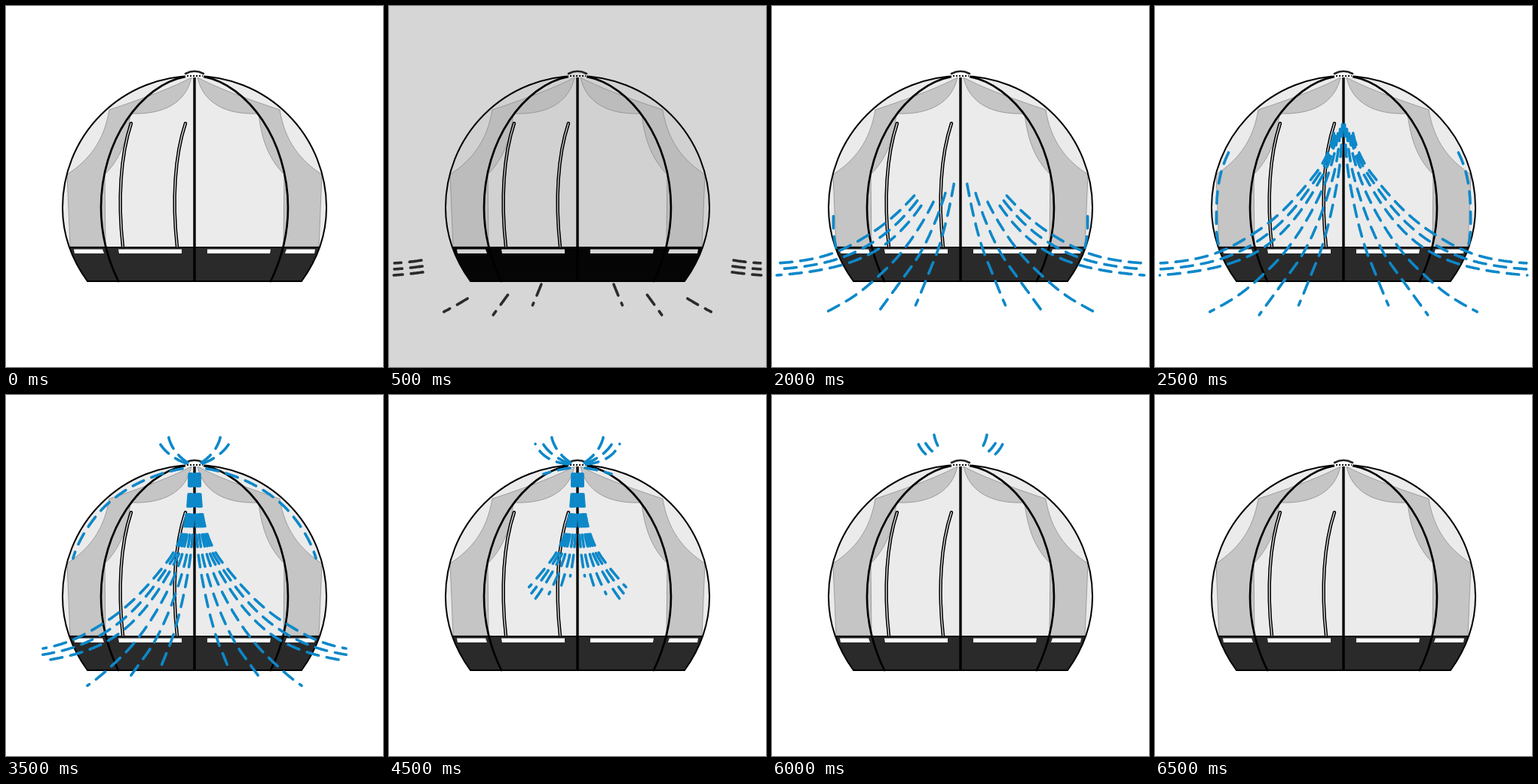
Recreate the animation shown at these times as an HTML page. Size 500 px wide and 480 px high, loop 7000 ms.

```html
<!DOCTYPE html>
<html lang="en">
<head>
<meta charset="utf-8">
<title>Tent airflow</title>
<style>
  html, body { margin: 0; width: 100%; height: 100%; overflow: hidden; }
  svg {
    display: block; width: 100%; height: 100%; fill: none; stroke-linecap: round;
    --paper: #fff; --net: #ebebeb; --cloth: #c5c5c5; --base: #2a2a2a; --air: #0d88c9;
    background: var(--paper);
  }
  svg.dim { --paper: #d6d6d6; --net: #d1d1d1; --cloth: #bcbcbc; --base: #050505; --air: #2b2b2b; }
  .line { stroke: #000; }
  .cloth { fill: var(--cloth); stroke: #858585; stroke-width: .7; }
  .paper { fill: var(--paper); }
  .air { stroke: var(--air); stroke-width: 3.6; stroke-dasharray: 16 11; }
</style>
</head>
<body>
<svg id="stage" viewBox="0 0 500 480">
  <defs>
    <path id="dome" d="M108 366C87 337 75 303 75 268A175 175 0 0 1 425 268C425 303 413 337 392 366Z"/>
  </defs>
  <use href="#dome" fill="var(--net)"/>
  <path id="curtain" class="cloth" d="M246 95Q215 112 137 138C130 180 110 205 81 224L85 320H132L131 224C150 205 161 180 165 143C210 145 239 128 246 95Z"/>
  <use href="#curtain" transform="matrix(-1 0 0 1 500 0)"/>
  <path fill="var(--base)" d="M83 320Q92 345 108 366H392Q408 345 417 320Z"/>
  <path class="line" stroke-width="2" d="M84 321H416"/>
  <g id="half">
    <path class="paper" d="M90 323.500H128L130 329H91ZM149 323.500H233V329H150Z"/>
    <path class="line" stroke-width="2.7" d="M238 94C179 105 126 179 126 268C126 300 134 335 149 366"/>
  </g>
  <use href="#half" transform="matrix(-1 0 0 1 500 0)"/>
  <g id="poles"></g>
  <use href="#dome" class="line" stroke-width="2"/>
  <path class="line" stroke-width="3.4" stroke-linecap="butt" d="M250 95V366"/>
  <path class="paper" d="M238 91Q250 86 262 91V95H238Z"/>
  <path class="line" stroke-width="2" stroke-linecap="butt" stroke-dasharray="2 2" d="M240 93H261"/>
  <path stroke="#222" stroke-width="2.6" d="M238 90Q250 83.500 262 90"/>
  <g id="air"></g>
  <use href="#air" transform="matrix(-1 0 0 1 500 0)"/>
</svg>
<script>
const LOOP = 7000, STEP = 500;
const stage = document.getElementById('stage');
const air = document.getElementById('air');
const clamp = value => Math.max(0, Math.min(1, value));

function addPath(parent, attributes) {
  const path = document.createElementNS('http://www.w3.org/2000/svg', 'path');
  for (const key in attributes) path.setAttribute(key, attributes[key]);
  return parent.appendChild(path);
}

const poles = document.getElementById('poles');
for (const x of [166, 238]) {
  const d = `M${x} 156c-14 42 -18 102 -11 164`;
  addPath(poles, { d, stroke: '#000', 'stroke-width': 4.4 });
  addPath(poles, { d, stroke: 'var(--net)', 'stroke-width': 1.3 });
}

const sideCurve = i =>
  `M${243 + i} 105C${243 + i} 160 ${235 + 2 * i} 195 ${212 + 5.5 * i} 224` +
  `S${165 + 10 * i} ${281 + 5 * i} ${130 + 10 * i} ${303 + 7 * i}` +
  `S70 ${338 + 7.5 * i} 6 ${342 + 8 * i}`;

// Curves start at the vent. head and tail give the travelled share of the way at each step.
const streams = [
  { // air drawn in from the sides and the ground, rising to the vent
    curves: [
      ...[0, 1, 2].map(sideCurve),
      'M246 105C246 165 240 195 229 226S190 312 154 347S106 389 72 407',
      'M247 105C247 165 244 198 236 228S210 312 186 345L138 411',
      'M249 105C249 172 247 202 242 232S226 315 212 345Q197 383 190 399'
    ],
    head: step => 0.1 * step + 0.0026 * step ** 3,
    tail: step => (Math.max(0, step - 5) / 5.2) ** 2.3
  },
  { // air climbing the wall
    curves: ['M240 97C190 104 145 130 122 158S84 215 82 260S83 310 85 322'],
    head: step => 0.28 * (step - 3.5),
    tail: step => 0.27 * (step - 5.75)
  },
  { // air leaving through the vent
    curves: ['M239 91C226 86 212 78 203 63', 'M241 90C226 80 218 68 215 53'],
    outward: true,
    head: step => step - 6,
    tail: step => (step - 10) / 3
  },
  {
    curves: ['M238 92C220 90 203 84 194 65'],
    outward: true,
    head: step => step - 7,
    tail: step => (step - 10) / 3
  }
].flatMap(({ curves, ...motion }) => curves.map(d => {
  const path = addPath(air, { d, class: 'air' });
  const points = [];
  for (let at = 0; at <= path.getTotalLength(); at += 1.5) {
    const { x, y } = path.getPointAtLength(at);
    points.push(`${x.toFixed(1)} ${y.toFixed(1)}`);
  }
  return { path, points, ...motion };
}));

function showStep(step) {
  stage.classList.toggle('dim', step === 1);
  for (const { path, points, outward, head, tail } of streams) {
    const front = clamp(head(step)), back = clamp(tail(step));
    const [from, to] = outward ? [back, front] : [1 - front, 1 - back];
    const visible = points.slice(Math.round(from * points.length), Math.round(to * points.length));
    path.setAttribute('d', visible.length > 1 ? 'M' + visible.join('L') : '');
  }
}

let shown = -1;
function frame() {
  const step = Math.floor(performance.now() % LOOP / STEP);
  if (step !== shown) showStep(shown = step);
  requestAnimationFrame(frame);
}
frame();
</script>
</body>
</html>
```
